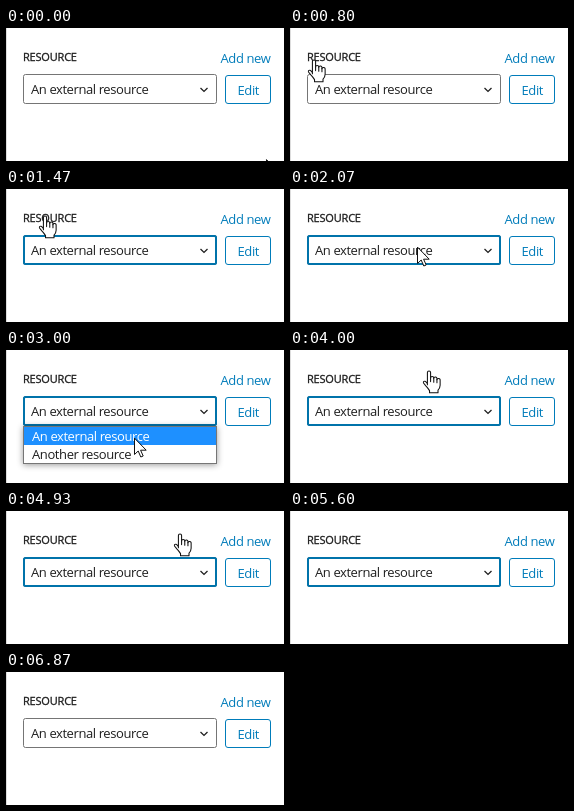
Write an HTML page that moves like this. It is 278 by 133 pixels and loops after 6940 ms.

```html
<!DOCTYPE html>
<html lang="en">
<head>
<meta charset="utf-8">
<title>Resource select</title>
<style>
html, body { margin: 0; width: 100%; height: 100%; overflow: hidden; background: #fff; }
svg { display: block; }
text { font: 13px "Open Sans", "Noto Sans", sans-serif; letter-spacing: -.4px; fill: #1e1e1e; }
.label { font-size: 11px; letter-spacing: -.2px; stroke: #1e1e1e; stroke-width: .3; }
.link { fill: #007cba; }
.shadow { filter: drop-shadow(0 1px 3px rgba(0, 0, 0, .4)); }
#cursor path { fill: #fff; stroke: #111; stroke-linejoin: round; stroke-linecap: round; }
</style>
</head>
<body>
<svg width="278" height="133" viewBox="0 0 278 133">
  <rect width="1" height="133" fill="#ddd"/>
  <text class="label" x="17" y="33">RESOURCE</text>
  <text class="link" x="214.5" y="35">Add new</text>
  <rect x="219.5" y="47.5" width="45" height="28" rx="2.5" fill="none" stroke="#007cba"/>
  <text class="link" x="231.5" y="67">Edit</text>

  <rect x="17.5" y="46.5" width="193" height="29" rx="2" fill="#fff" stroke="#757575"/>
  <rect id="focus" x="18" y="47" width="192" height="28" rx="1.5" fill="none" stroke="#0073aa" stroke-width="2"/>
  <text x="25" y="66">An external resource</text>
  <path d="M194.5 60l3.5 3.4 3.5-3.4" fill="none" stroke="#1e1e1e" stroke-width="1.3"/>

  <g id="popup">
    <rect class="shadow" x="17.5" y="76.5" width="193" height="37" fill="#fff" stroke="#767676"/>
    <rect id="mark" x="18" width="192" height="18" fill="#1e90ff"/>
    <text class="option" x="26" y="91">An external resource</text>
    <text class="option" x="26" y="109">Another resource</text>
  </g>

  <g id="cursor">
    <path id="arrow" d="M.5.5V16.5l3.7-3.5 2.6 6 2.4-1-2.6-5.8h5.2z"/>
    <g id="hand" transform="scale(1.06)">
      <path d="M-1.5 13V1.5a1.5 1.5 0 0 1 3 0V6.5a1.5 1.4 0 0 1 3 0V7a1.5 1.4 0 0 1 3 .3V8.2a1.5 1.4 0 0 1 3 .5V13.5Q10.5 16 8.5 18V20.5H.5V18.5Q-1 16-3 14L-5.2 11.3Q-5.6 9.4-3.8 9.6Q-2.5 10.2-1.5 12"/>
      <path d="M1.5 6.5V10M4.5 7V10.5M7.5 8V11"/>
    </g>
  </g>
</svg>
<script>
const LOOP = 6940, TICK = 200 / 3;
const $ = id => document.getElementById(id);
const options = document.querySelectorAll('.option');

// Pointer glides in ticks; the picture only changes on a tick
const start = { x: 260, y: 131.5 };
const glides = [
  { from: 1, to: 1, x: 45, y: 141 },
  { from: 8, to: 12, x: 24, y: 32 },
  { from: 14, to: 16, x: 39, y: 27 },
  { from: 26, to: 31, x: 127, y: 58 },
  { from: 44, to: 46, x: 129, y: 98 },
  { from: 51, to: 52, x: 120, y: 89 },
  { from: 53, to: 58, x: 139, y: 21 },
  { from: 63, to: 67, x: 174, y: 23 },
  { from: 81, to: 84, x: 75, y: 150 }
];

const ease = k => k * k * (3 - 2 * k);

function pointer(tick) {
  let { x, y } = start;
  for (const g of glides) {
    if (tick < g.from) break;
    const k = ease(Math.min(1, (tick - g.from + 1) / (g.to - g.from + 1)));
    x += (g.x - x) * k;
    y += (g.y - y) * k;
  }
  return [x, y];
}

const show = (id, on) => $(id).style.display = on ? '' : 'none';

function draw(now) {
  const tick = Math.floor((now % LOOP + 4) / TICK);
  const within = (from, to) => tick >= from && tick < to;
  const [x, y] = pointer(tick);
  const open = within(39, 60);
  const hand = y < 44 && !open;
  const second = within(46, 53);

  show('focus', within(22, 71) || within(74, 103));
  show('popup', open);
  show('arrow', !hand);
  show('hand', hand);
  $('mark').setAttribute('y', second ? 95 : 77);
  options.forEach((option, i) => option.style.fill = i === +second ? '#fff' : '#1e1e1e');
  $('cursor').setAttribute('transform', `translate(${Math.round(x)} ${y < 130 ? Math.round(y) : y})`);
  requestAnimationFrame(draw);
}
draw(0);
</script>
</body>
</html>
```
